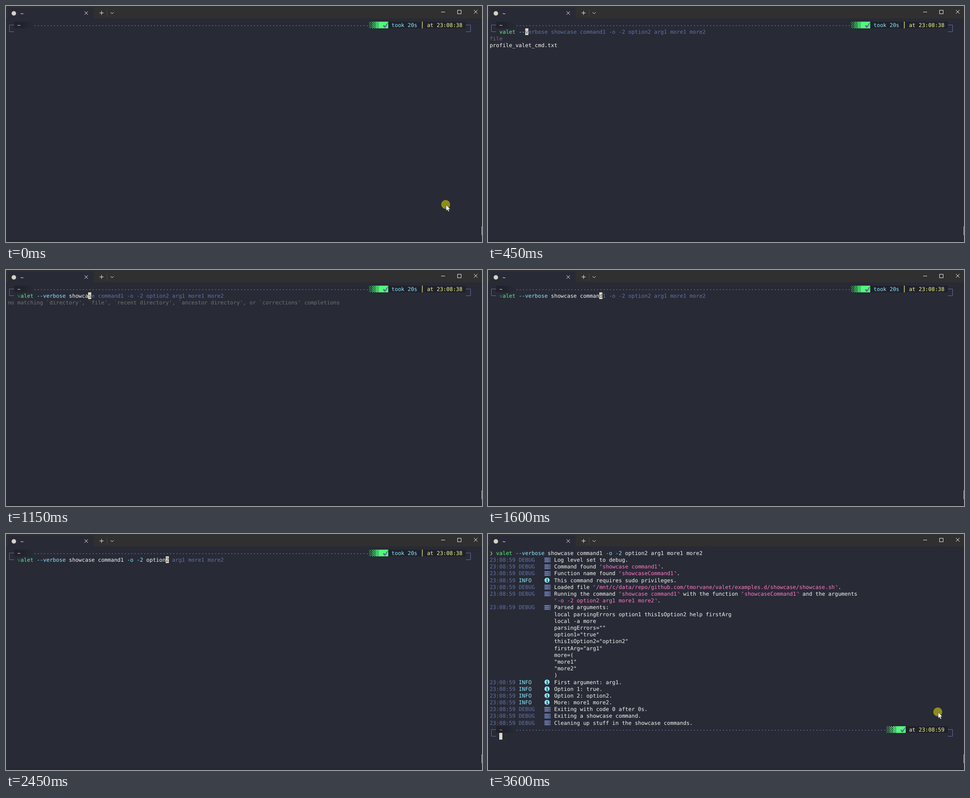
Write an HTML page that moves like this. It is 1061 by 528 pixels and loops after 8 s.

```html
<!DOCTYPE html>
<html lang="en">
<head>
<meta charset="utf-8">
<title>Terminal</title>
<style>
html, body { margin: 0; width: 100%; height: 100%; overflow: hidden; background: #282a36; }
svg { display: block; }
text {
  font: 11.95px "DejaVu Sans Mono", "Noto Sans Mono", monospace;
  white-space: pre;
  text-rendering: geometricPrecision;
  font-variant-ligatures: none;
}
.line { fill: none; stroke: #f4f4f4; stroke-width: 1; }
</style>
</head>
<body>
<svg id="stage" width="1061" height="528" viewBox="0 0 1061 528">
  <defs>
    <linearGradient id="fade">
      <stop offset="0" stop-color="#20212b"/>
      <stop offset=".45" stop-color="#22232d"/>
      <stop offset="1" stop-color="#282a36"/>
    </linearGradient>
    <pattern id="light" width="4" height="4" patternUnits="userSpaceOnUse">
      <path d="M0 0h1.5v1.5h-1.5zM2 2h1.5v1.5h-1.5z" fill="#50fa7b"/>
    </pattern>
    <pattern id="medium" width="4" height="4" patternUnits="userSpaceOnUse">
      <path d="M0 0h2v2h-2zM2 2h2v2h-2z" fill="#50fa7b"/>
    </pattern>
    <pattern id="dense" width="4" height="4" patternUnits="userSpaceOnUse">
      <path d="M0 0h4v4h-4z" fill="#50fa7b"/>
      <path d="M0 0h1.4v1.4h-1.4zM2 2h1.4v1.4h-1.4z" fill="#23382f"/>
    </pattern>
  </defs>
  <rect width="1061" height="528" fill="#282a36"/>
  <rect width="1061" height="28" fill="#303030"/>
  <path d="M0 28q4 0 4-4V11q0-8 8-8H188q8 0 8 8V24q0 4 4 4z" fill="#282a36"/>
  <circle cx="17.5" cy="16.5" r="5" fill="#d6d2c4"/>
  <text x="32" y="21" fill="#fff">~</text>
  <path class="line" d="M175 12l7.5 7.5m0-7.5l-7.5 7.5M208.5 15.5h9m-4.5-4.5v9M233 14l3.5 3.5l3.5-3.5M970 13.5h8.5M1006.5 9.5h8v8h-8zM1043 9l8 8m0-8l-8 8"/>
  <path d="M225.5 8v16" stroke="#454545"/>
  <rect x="1060" y="493" width="1" height="20" fill="#c4c4c4"/>
  <rect y="524" width="1061" height="4" fill="#252732"/>
  <g id="screen"></g>
  <g id="pointer">
    <circle r="10" fill="#8f8d19"/>
    <path d="M1 1v13.2l3-2.7l2 4.5l2.2-1l-2-4.3h4.2z" fill="#fff" stroke="#222" stroke-width=".6"/>
  </g>
</svg>
<script>
const CELL = 7.19, LEFT = 3.7, TOP = 35, ROW = 15.19, LOOP = 8000;
const GREEN = "#50fa7b", CYAN = "#8be9fd", WHITE = "#f8f8f2", BLUE = "#6272a4",
      PINK = "#ff79c6", YELLOW = "#f1fa8c", DARK = "#20212b", GREY = "#73736f", BLOCK = "#dcd8c6";
const COMMAND = "valet --verbose showcase command1 -o -2 option2 arg1 more1 more2";

const screen = document.getElementById("screen");
const pointer = document.getElementById("pointer");
const x = col => LEFT + col * CELL;
const y = row => TOP + row * ROW;
const span = (str, color) => `<tspan fill="${color}">${str}</tspan>`;
const text = (row, col, body, color = WHITE) =>
  `<text x="${x(col)}" y="${y(row) + 11.9}" fill="${color}">${body}</text>`;
const rect = (left, top, w, h, fill) =>
  `<rect x="${left}" y="${top}" width="${w}" height="${h}" fill="${fill}"/>`;
const cursor = (row, col) =>
  rect(Math.round(x(col)), Math.round(y(row)), 7, 15, BLOCK);

// Keystroke times: one every 50 ms, with a few longer pauses.
const slow = new Set([32, 39, 46, 52, 57, 64]);
const keys = [];
for (let n = 0, at = 50; n <= COMMAND.length; n++) {
  keys.push(at);
  at += slow.has(n) ? 100 : 50;
}
const DONE = 3600;

function colored(count) {
  let pos = 0;
  return COMMAND.split(/(?<= )/).map(word => {
    const part = word.slice(0, Math.max(0, count - pos));
    const color = pos === 0 ? GREEN : word[0] === "-" ? CYAN : WHITE;
    pos += word.length;
    return span(part, color);
  }).join("");
}

function header(row, shadeCol, time, took, tilde) {
  const top = Math.round(y(row)), mid = top + 8 - .5, start = x(shadeCol);
  const okEnd = start + 6 * CELL;
  let out = rect(18, top, 44, 15, "url(#fade)") + text(row, 3, "~", tilde);
  out += `<path d="M${x(8) + 2.4} ${top + 9}H${start - 1}" stroke="${BLUE}" stroke-width="1.3" stroke-dasharray="2.2 ${CELL - 2.2}"/>`;
  ["light", "medium", "dense"].forEach((name, i) => {
    out += rect(start + i * CELL, top, CELL, 15, DARK) +
           rect(start + i * CELL, top, CELL, 15, `url(#${name})`);
  });
  out += rect(start + 3 * CELL, top, 3 * CELL, 15, GREEN);
  out += rect(okEnd, top, 1025 - okEnd, 15, DARK);
  out += `<path d="M${okEnd - 12} ${top + 9}l2.5-1.5l2 2.5l6-7.5l1.4 .6l-6.6 10.4h-2z" fill="#5b5e9c"/>`;
  if (took) {
    out += text(row, 119, took, CYAN) + rect(927.3, top, 1.3, 15, YELLOW);
  }
  out += text(row, 130, "at " + time, YELLOW);
  return out + `<path d="M18 ${mid}H7.5v15H18M1025 ${mid}h10.5v15H1025" fill="none" stroke="${BLUE}"/>`;
}

function prompt(typed) {
  let out = header(0, 112, "23:08:38", "took 20s", "#f4e6f0");
  if (typed < 0) return out;
  out += cursor(1, 3 + typed);
  if (typed > 0) {
    out += text(1, 3, colored(typed) + span(COMMAND.charAt(typed), "#5c5c58") +
                      span(COMMAND.slice(typed + 1), BLUE));
  }
  if (typed >= 17) out += rect(x(3), y(1), CELL, ROW, "#282a3688");
  if (typed >= 5 && typed < 17) {
    out += text(2, 0, "file", GREY) + text(3, 0, "profile_valet_cmd.txt");
  } else if (typed >= 18 && typed < 26) {
    out += text(2, 0, "no matching `directory', `file', `recent directory', `ancestor directory', or `corrections' completions", GREY);
  }
  return out;
}

// D and I start a log entry, a blank continues the one above.
const LOG = `D Log level set to debug.
D Command found ⌜showcase command1⌝.
D Function name found ⌜showcaseCommand1⌝.
I This command requires sudo privileges.
D Loaded file ⌜/mnt/c/data/repo/github.com/tmorvane/valet/examples.d/showcase/showcase.sh⌝.
D Running the command ⌜showcase command1⌝ with the function ⌜showcaseCommand1⌝ and the arguments
  ⌜-o -2 option2 arg1 more1 more2⌝.
D Parsed arguments:
  local parsingErrors option1 thisIsOption2 help firstArg
  local -a more
  parsingErrors=""
  option1="true"
  thisIsOption2="option2"
  firstArg="arg1"
  more=(
  "more1"
  "more2"
  )
I First argument: arg1.
I Option 1: true.
I Option 2: option2.
I More: more1 more2.
D Exiting with code 0 after 0s.
D Exiting a showcase command.
D Cleaning up stuff in the showcase commands.`.split("\n");

function icon(row, info) {
  const top = y(row);
  if (info) {
    return `<circle cx="131.6" cy="${top + 7.6}" r="5.7" fill="${CYAN}"/>` +
      `<path d="M130.2 ${top + 6.8}h2v4m-2 0h4M131 ${top + 4.5}h1.6" stroke="#282a36" stroke-width="1.5" fill="none"/>`;
  }
  return [2.6, 6.4, 10.2].map(dy =>
    rect(125.8, top + dy, 13.6, 2.8, "#6c7db4") + rect(135.5, top + dy + .9, 2, 1, "#282a36")).join("");
}

function message(row, body) {
  let col = 20;
  return body.split(/(⌜.*?⌝)/).map(part => {
    const out = text(row, col, part, part[0] === "⌜" ? PINK : WHITE);
    col += part.length;
    return out;
  }).join("");
}

function output() {
  let out = text(0, 0, "❯", "#b9b428") + text(0, 2, colored(COMMAND.length));
  LOG.forEach((entry, i) => {
    const row = i + 1, info = entry[0] === "I";
    if (entry[0] !== " ") {
      out += text(row, 0, "23:08:59", BLUE) +
             text(row, 9, info ? "INFO" : "DEBUG", info ? CYAN : BLUE) + icon(row, info);
    }
    out += message(row, entry.slice(2));
  });
  return out + header(26.5 - .5, 123, "23:08:59", "", PINK) + cursor(27, 3);
}

let shown;
function draw(t) {
  const done = t >= DONE;
  const typed = done ? "done" : keys.filter(k => k <= t).length - 1;
  if (typed === shown) return;
  shown = typed;
  screen.innerHTML = done ? output() : prompt(typed);
  pointer.setAttribute("transform", done ? "translate(1002.5 398)" : "translate(980 444)");
  pointer.setAttribute("visibility", done || typed < 1 ? "visible" : "hidden");
}

const begin = performance.now();
function tick() {
  draw((performance.now() - begin) % LOOP);
  requestAnimationFrame(tick);
}
tick();
</script>
</body>
</html>
```
